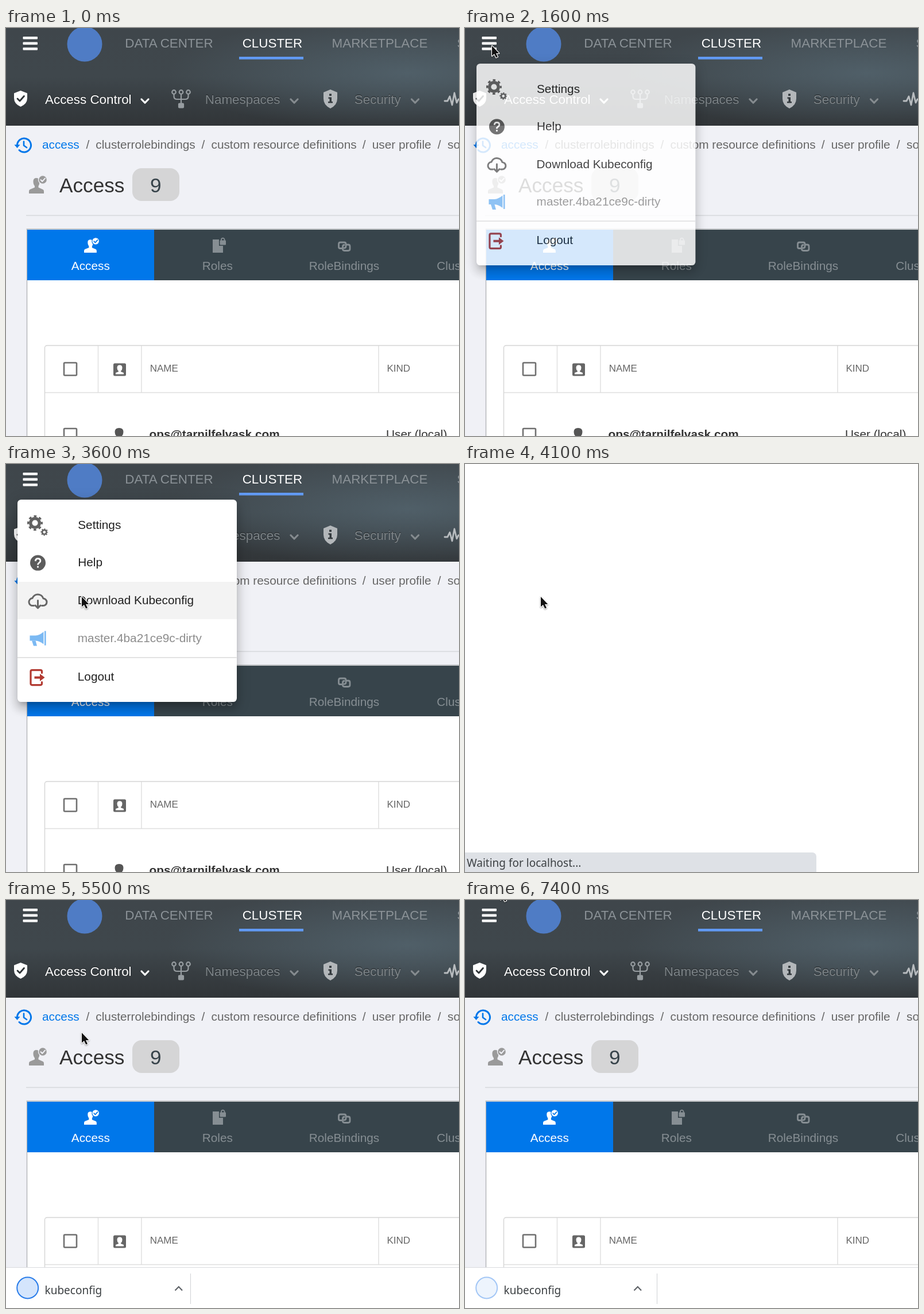
Animation, 789 px wide and 710 px high, one loop 7500 ms. Source, as an HTML page:

```html
<!DOCTYPE html>
<html lang="en">
<head>
<meta charset="utf-8">
<title>Cluster access</title>
<style>
  html, body { margin: 0; width: 100%; height: 100%; overflow: hidden; background: #fff; }
  #stage { position: relative; width: 789px; height: 710px; overflow: hidden; background: #f0f1f6; }
  #stage > *, #menu > *, #shelf *, #head { position: absolute; }
  #head {
    left: 0; top: 0; width: 789px; height: 170px;
    background:
      radial-gradient(ellipse 420px 100px at 700px 78px, rgba(84, 101, 111, .8), rgba(84, 101, 111, 0)),
      linear-gradient(#3f464b 0, #3f474c 50%, #373d41 75%, #313538 100%);
  }
  svg { left: 0; top: 0; overflow: visible; }
  text { font-family: "Liberation Sans", Arial, sans-serif; }
  .nav { font-size: 22.4px; fill: #8b9297; }
  .sub { font-size: 22.4px; fill: #7d8488; text-shadow: 0 -1px 1px #202325; }
  .crumb { font-size: 20.8px; fill: #666; }
  .link { fill: #0077ea; }
  .title { font-size: 35.2px; fill: #333; }
  .tab { font-size: 20.8px; fill: #868e93; text-anchor: middle; }
  .th { font-size: 17px; fill: #666; }
  .td { font-size: 20.8px; fill: #333; }
  .on { fill: #fff; }
  .line { fill: none; stroke-linecap: round; stroke-linejoin: round; }
  #menu {
    left: 19.5px; top: 62.4px; width: 381.6px; height: 352.2px; border-radius: 6.4px;
    background: #fff; transform-origin: 0 0;
    box-shadow: 0 8px 8px -5px rgba(0,0,0,.2), 0 12.8px 16px 1.6px rgba(0,0,0,.14), 0 4.8px 22px 4.8px rgba(0,0,0,.12);
  }
  #menu text { font-size: 20.8px; fill: #212121; }
  #menu .dim { fill: #8c8c8c; }
  #hover { left: 0; top: 142.8px; width: 100%; height: 65.6px; background: #f3f3f3; }
  #blank { inset: 0; background: #fff; }
  #status {
    position: absolute; left: 0; top: 676px; width: 609px; height: 34px; padding-left: 3px;
    background: #dee1e6; border-radius: 0 7px 0 0; color: #3c4043;
    font: 19px/36px "Noto Sans", sans-serif;
  }
  #shelf { left: 0; top: 640px; width: 789px; height: 70px; background: #fff; box-shadow: 0 -1px 0 #d9dbde; }
  #item { left: 0; top: 0; height: 70px; overflow: hidden; }
  #item::after { content: ""; position: absolute; right: 0; top: 10px; width: 1px; height: 53px; background: #cfd1d4; }
  #item text { font: 19px "Noto Sans", sans-serif; fill: #3c4043; }
</style>
</head>
<body>
<div id="stage">
  <div id="head"></div>
  <svg width="789" height="710">
    <defs>
      <g id="user">
        <path fill="currentColor" d="M0 31V27Q0 24 4 23L10 20.500V18Q7 14 7.500 9Q8 4 13 4Q18.500 4 18.500 10Q18.500 15 16.500 18V20.500L22 23Q26 24 26 27V31Z"/>
        <circle cx="24" cy="7" r="7.500" fill="currentColor" stroke="var(--bg)" stroke-width="1.400"/>
        <path class="line" d="M20.500 7.200L23.200 10L28 4.600" stroke="var(--bg)" stroke-width="2"/>
      </g>
      <path id="chev" class="line" d="M-6-3L0 3.200L6-3" stroke-width="3.200"/>
      <rect id="box" x="101" y="-11" width="22" height="22" rx="1.500" fill="none" stroke="#707070" stroke-width="2.600"/>
    </defs>

    <g fill="#fff">
      <rect x="29.500" y="15" width="25.500" height="4.400" rx="1"/>
      <rect x="29.500" y="24.500" width="25.500" height="4.400" rx="1"/>
      <rect x="29.500" y="34" width="25.500" height="4.400" rx="1"/>
    </g>
    <circle cx="137" cy="28" r="30.500" fill="#4f7cc5"/>
    <text class="nav" x="207.300" y="34">DATA CENTER</text>
    <text class="nav on" x="411.700" y="34">CLUSTER</text>
    <text class="nav" x="567.600" y="34">MARKETPLACE</text>
    <text class="nav" x="785.500" y="34">S</text>
    <rect x="406" y="50" width="112" height="4.600" fill="#619af4"/>

    <path fill="#fff" d="M25.500 109L37 113.500V122Q37 132 25.500 137Q14 132 14 122V113.500Z"/>
    <path class="line" d="M20 123L24 127L31.500 118.500" stroke="#2f3437" stroke-width="2.800"/>
    <text class="sub on" x="68" y="132">Access Control</text>
    <use href="#chev" x="242" y="127" stroke="#fff"/>
    <g fill="none" stroke="#979da1" stroke-width="2.200">
      <circle cx="292.500" cy="111.500" r="3.300"/><circle cx="305" cy="111.500" r="3.300"/><circle cx="317.500" cy="111.500" r="3.300"/>
      <path d="M292.500 115V119Q292.500 124 298 124H312Q317.500 124 317.500 119V115M305 115V131"/>
      <rect x="301" y="131.500" width="8" height="7" rx="1" fill="#979da1"/>
    </g>
    <text class="sub" x="346.800" y="132">Namespaces</text>
    <use href="#chev" x="502" y="127" stroke="#858b8f"/>
    <path fill="#b3b7ba" d="M565 107L577 112V123Q577 134 565 140Q553 134 553 123V112Z"/>
    <path fill="#33393d" d="M563 114.500H567V118H563ZM561.500 120.500H567V128H569V130.500H561V128H563.500V123H561.500Z"/>
    <text class="sub" x="606.800" y="132">Security</text>
    <use href="#chev" x="712.500" y="127" stroke="#858b8f"/>
    <path class="line" d="M764 127H769L773 119L777 134L781 113L785 130L788 124H795" stroke="#b8bcbf" stroke-width="2.800"/>

    <g class="line" stroke="#0077ea" stroke-width="3">
      <path d="M19.500 204A12 12 0 1 1 23 212.500"/>
      <path d="M31 197.500V204.500L36 208" stroke-width="2.600"/>
    </g>
    <path fill="#0077ea" d="M14.500 203H24.500L19.500 209Z"/>
    <g id="crumbs"></g>

    <use href="#user" x="40" y="257" color="#9a9a9a" style="--bg:#f0f1f6"/>
    <text class="title" x="93" y="286">Access</text>
    <rect x="220" y="244" width="82" height="57" rx="16" fill="#d5d5d6"/>
    <text class="title" x="251" y="286" style="fill:#37434a">9</text>
    <rect x="35" y="325.500" width="754" height="1.600" fill="#d7d9dd"/>

    <rect x="36.500" y="349.800" width="780" height="400" fill="#fff" stroke="#b9bbbe" stroke-width="1.600"/>
    <rect x="37" y="351" width="752" height="88" fill="#37444b"/>
    <rect x="37" y="351" width="221" height="88" fill="#0077ea"/>
    <use href="#user" transform="translate(136 365) scale(.84)" color="#fff" style="--bg:#0077ea"/>
    <g fill="#868e93">
      <path d="M360 368H371V379H378V391H360Z"/>
      <rect x="372.500" y="369.500" width="10.500" height="8" rx="1"/>
      <path d="M375 370V368.500A2.800 2.800 0 0 1 380.600 368.500V370" fill="none" stroke="#868e93" stroke-width="1.800"/>
    </g>
    <g class="line" stroke="#868e93" stroke-width="2.800">
      <path d="M584.500 383.500H582Q579.500 383.500 579.500 381V376Q579.500 373 582.500 373H589Q592 373 592 376V380Q592 383 589 383"/>
      <path d="M593.500 377H596Q599 377 599 380V384.500Q599 387.500 596 387.500H589.500Q586.500 387.500 586.500 384.500V380.500Q586.500 377.500 589 377.500"/>
    </g>
    <text class="tab on" x="147.300" y="421">Access</text>
    <text class="tab" x="368.300" y="421">Roles</text>
    <text class="tab" x="589" y="421">RoleBindings</text>
    <text class="tab" x="750.300" y="421" style="text-anchor:start">ClusterRoles</text>

    <g fill="none" stroke="#d4d4d4" stroke-width="1.400">
      <rect x="67.500" y="552.500" width="760" height="200" rx="4"/>
      <path d="M160.500 553V634M236 553V634M649 553V634M68 634.500H789" stroke="#dedede"/>
    </g>
    <use href="#box" y="593.500"/>
    <use href="#box" y="708"/>
    <rect x="187" y="583.500" width="22" height="22" rx="2.500" fill="#666"/>
    <path fill="#fff" d="M198 586.500Q202.500 586.500 202.500 591.500Q202.500 595 200 597V598L205 600V602.500H191V600L196 598V597Q193.500 595 193.500 591.500Q193.500 586.500 198 586.500Z"/>
    <path fill="#555" d="M197 696Q204.500 696 204.500 703Q204.500 707 202 710H192Q189.500 707 189.500 703Q189.500 696 197 696Z"/>
    <text class="th" x="250.700" y="598">NAME</text>
    <text class="th" x="663.400" y="598">KIND</text>
    <text class="td" x="249.500" y="714" font-weight="700">ops@tarnilfelvask.com</text>
    <text class="td" x="662" y="714">User (local)</text>
  </svg>

  <div id="menu">
    <div id="hover"></div>
    <svg width="381" height="352" viewBox="19.5 62.4 381 352">
      <g id="gears" fill="none" stroke="#616161"></g>
      <circle cx="55" cy="172.500" r="13.500" fill="#5c5c5c"/>
      <path class="line" d="M50.800 169.500Q51 165 55 165Q59.400 165 59.400 169Q59.400 171 57 172.500Q55 173.800 55 176" stroke="#fff" stroke-width="2.800" style="stroke-linecap:butt"/>
      <rect x="53.600" y="178" width="2.800" height="2.800" fill="#fff"/>
      <g class="line" stroke="#666" stroke-width="3">
        <path d="M48 247H46.500A6.500 6.500 0 0 1 45.500 234A10 10 0 0 1 64.500 234.500A6.200 6.200 0 0 1 64 247H62"/>
        <path d="M55 238V250M50.500 246.500L55 251L59.500 246.500"/>
      </g>
      <g fill="#7bb9f3">
        <path d="M41 299H51Q58 298.500 65 292.500V314Q58 308.500 51 308H41Z"/>
        <path d="M44.500 308H51L53.500 317H47.500Z"/>
        <rect x="66.500" y="291" width="2.600" height="25"/>
      </g>
      <g class="line" stroke="#b23a31" stroke-width="3.200">
        <path d="M62 364V361.500Q62 359 59.500 359H45Q42.500 359 42.500 361.500V382.500Q42.500 385 45 385H59.500Q62 385 62 382.500V380"/>
        <path d="M49 372H60" stroke-width="4" style="stroke-linecap:butt"/>
      </g>
      <path fill="#b23a31" d="M58.500 365.500L67 372L58.500 378.500Z"/>
      <text x="124.700" y="113.300">Settings</text>
      <text x="124.700" y="178.900">Help</text>
      <text x="124.300" y="244.500">Download Kubeconfig</text>
      <text x="124.300" y="310.100" class="dim">master.4ba21ce9c-dirty</text>
      <text x="124.300" y="377">Logout</text>
      <rect x="19.500" y="336.400" width="381.600" height="1.600" fill="#dcdcdc"/>
    </svg>
  </div>

  <div id="shelf">
    <div id="item">
      <svg width="335" height="70">
        <circle id="ring" cx="37.700" cy="35" r="18.500" fill="#1a73e8" fill-opacity=".2" stroke="#1a73e8" stroke-width="2"/>
        <text x="67.500" y="46">kubeconfig</text>
        <path d="M294.500 39.500L300.800 33L307 39.500" fill="none" stroke="#5f6368" stroke-width="2.200"/>
      </svg>
    </div>
  </div>

  <svg id="drop" width="97" height="100">
    <circle cx="48.500" cy="50" r="48" fill="#fff" fill-opacity=".8"/>
    <path fill="#1a73e8" d="M42 23H55.500V37H62L48.700 52.500L35.500 37H42ZM26.500 70.500H71V77H26.500Z"/>
  </svg>

  <div id="blank"><div id="status">Waiting for localhost...</div></div>

  <svg id="cursor" width="16" height="24">
    <path d="M0 0V17.500L4 14L7.200 20.500L10 19.200L7 13H12.300Z" fill="#111" stroke="#fff" stroke-width="2.400" stroke-linejoin="round"
      paint-order="stroke" style="filter:drop-shadow(.5px 1px 1px rgba(0,0,0,.4))"/>
  </svg>
</div>

<script>
const LOOP = 7500, STEP = 100;
const $ = id => document.getElementById(id);
const anims = [];

// rows: [ms, value, easing]
function track(id, prop, rows, easing = 'linear') {
  const frames = rows.map(([ms, value, ease = easing]) => ({ offset: ms / LOOP, [prop]: value, easing: ease }));
  if (rows[0][0] > 0) frames.unshift({ ...frames[0], offset: 0 });
  frames.push({ ...frames[frames.length - 1], offset: 1 });
  const a = $(id).animate(frames, { duration: LOOP, fill: 'both' });
  a.pause();
  anims.push(a);
}

function show(id, from, to) {
  track(id, 'visibility', [[0, 'hidden'], [from, 'visible'], [to, 'hidden']], 'step-end');
}

$('crumbs').innerHTML = [
  [63, 'access', 'link'], [139.5, '/'], [156.3, 'clusterrolebindings'], [340.5, '/'],
  [357.5, 'custom resource definitions'], [620.7, '/'], [637.8, 'user profile'], [751.8, '/'], [769, 'some']
].map(([x, s, c = '']) => `<text class="crumb ${c}" x="${x}" y="209.500">${s}</text>`).join('');

function gear(x, y, r, w) {
  const tooth = 2 * Math.PI * (r + w * .75) / 16;
  return `<circle cx="${x}" cy="${y}" r="${r}" stroke-width="${w}"/>` +
    `<circle cx="${x}" cy="${y}" r="${r + w * .75}" stroke-width="${w * .6}" stroke-dasharray="${tooth}" stroke-dashoffset="${tooth / 2}"/>`;
}
$('gears').innerHTML = gear(50, 103, 7.8, 5.4) + gear(66.3, 119, 3.7, 2.6);

const ease = 'cubic-bezier(.4,0,.2,1)';
show('menu', 1400, 3700);
track('menu', 'opacity', [[1350, 0, ease], [1800, 1]]);
track('menu', 'transform', [[1350, 'scale(.75,.5625)', ease], [1630, 'scale(1,1)']]);
show('hover', 3600, 3700);
show('blank', 3700, 4900);
show('status', 4100, 4900);
show('shelf', 4900, LOOP - 1);
track('shelf', 'transform', [[4900, 'translateY(35px)'], [5000, 'translateY(0)']]);
track('item', 'width', [[4863, '0px', 'cubic-bezier(.5,1,.89,1)'], [5663, '335px']]);
show('drop', 4900, 5500);
show('cursor', 600, LOOP - 1);

track('cursor', 'transform', [
  [600, 112, -8], [700, 103, 3], [800, 86, 14], [900, 68, 22], [1000, 54, 26], [1100, 45, 29], [1200, 47, 31],
  [1800, 47, 31], [2100, 69, 99], [2200, 84, 128], [2300, 100, 162], [2400, 96, 179],
  [2800, 96, 179], [2900, 165, 206], [3000, 231, 227], [3500, 231, 227], [3600, 132, 231],
  [6100, 132, 231], [6400, 128, 215], [6600, 120, 158], [6900, 92, 76], [7200, 60, 5], [7300, 60, -8], [7400, 62, -18]
].map(([ms, x, y]) => [ms, `translate(${x}px,${y}px)`]));

const born = performance.now();
function draw() {
  const t = Math.floor((performance.now() - born) % LOOP / STEP) * STEP;
  for (const a of anims) a.currentTime = t + .5;

  // download marker sinks 100px while fading in and out
  const p = .055 + (t - 4900) / 600;
  $('drop').style.opacity = Math.max(0, 1 - 4 * (p - .5) ** 2);
  $('drop').style.transform = `translateY(${509.5 + 100 * p}px)`;

  // finished download pulses twice a second
  $('ring').style.opacity = t < 5041 ? 1 : .5 + .5 * Math.cos((t - 5041) / 500 * 2 * Math.PI);
  requestAnimationFrame(draw);
}
draw();
</script>
</body>
</html>
```
